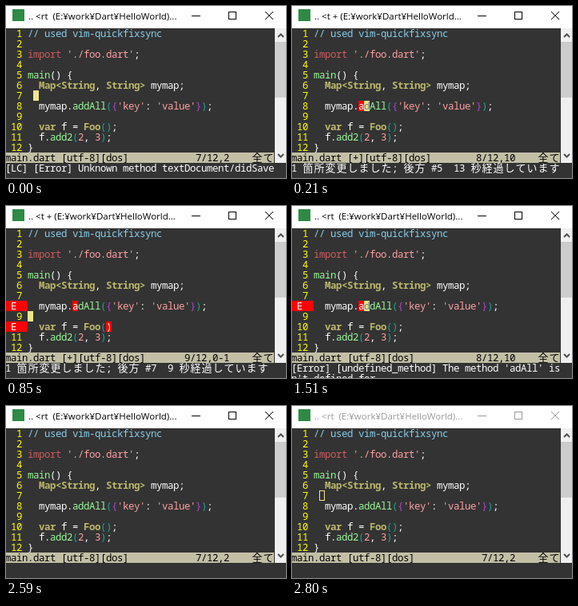
An HTML page with a canvas that plays this animation: 350x216 px, repeating every 2850 ms.

```html
<!DOCTYPE html>
<html lang="ja">
<head>
<meta charset="utf-8">
<title>Editor session</title>
<style>
html, body { margin: 0; width: 100%; height: 100%; overflow: hidden; background: #333; }
canvas { display: block; width: 350px; height: 216px; }
</style>
</head>
<body>
<canvas id="stage" width="350" height="216"></canvas>
<script>
const ctx = document.getElementById('stage').getContext('2d');

const LOOP = 2850;
const CELL_W = 7, CELL_H = 13, LEFT = -1, TOP = 28, COLS = 48, BASE = 11;
const MONO = '12.4px "Noto Sans Mono", "DejaVu Sans Mono", monospace';
const WIDE = '13px "Noto Sans CJK JP", "Noto Sans CJK", sans-serif';
const UI = '11.5px "Open Sans", "Noto Sans", sans-serif';

const C = {
  bg: '#333333', text: '#ffffff', number: '#ffff00', comment: '#87ceeb',
  include: '#cd5c5c', string: '#ffa0a0', type: '#bdb76b', func: '#98fb98',
  paren: '#20a39a', brace: '#a848cc', error: '#ff0000',
  cursor: '#f0e68c', onCursor: '#708090', status: '#c2bfa5'
};

const plain = s => [s, C.text];
const str = s => [s, C.string];
const func = s => [s, C.func];
const paren = s => [s, C.paren];
const type = s => [s, C.type, true];
const callLine = name => [
  plain('  mymap.'), func(name), paren('('), ['{', C.brace], str("'key'"), plain(': '),
  str("'value'"), ['}', C.brace], paren(')'), plain(';')
];

function codeLines(s) {
  return [
    [['// used vim-quickfixsync', C.comment]],
    [],
    [['import ', C.include], str("'./foo.dart'"), plain(';')],
    [],
    [func('main'), plain('() {')],
    [plain('  '), type('Map<String'), plain(', '), type('String>'), plain(' mymap;')],
    [],
    callLine(s.call),
    [],
    [type('  var'), plain(' f = '), type('Foo'), paren('()'), plain(s.noSemi ? '' : ';')],
    [plain('  f.'), func('add2'), paren('('), str('2'), plain(', '), str('3'), paren(')'), plain(';')],
    [plain('}')]
  ];
}

const undoText = (n, sec) => `1 箇所変更しました; 後方 #${n}  ${sec} 秒経過しています`;

// cursor: [line, column]; signs: lines with an error; marks: red cells
const saved = { call: 'addAll', cursor: [7, 2], pos: '7/12,2', signs: [], marks: [], msg: [] };
const broken = { call: 'adAll', modified: true, signs: [8, 10], noSemi: true,
  marks: [[8, 9], [10, 15]], msg: [undoText(7, 9)] };
const states = [
  { ...saved, at: 0, msg: ['[LC] [Error] Unknown method textDocument/didSave'] },
  { ...broken, at: 210, signs: [], noSemi: false, marks: [[8, 9]],
    cursor: [8, 10], pos: '8/12,10', msg: [undoText(5, 13)] },
  { ...broken, at: 430, cursor: [10, 15], pos: '10/12,15' },
  { ...broken, at: 850, cursor: [9, 1], pos: '9/12,0-1' },
  { ...saved, at: 1510, cursor: [8, 10], pos: '8/12,10', signs: [8], marks: [[8, 9]],
    msg: ["[Error] [undefined_method] The method 'adAll' is", "n't defined for"] },
  { ...saved, at: 1720 },
  { ...saved, at: 2590, shape: 'off' },
  { ...saved, at: 2800, shape: 'hollow', inactive: true }
];

const cellX = col => LEFT + col * CELL_W;
const rowY = row => TOP + row * CELL_H;

function box(x, y, w, h, color) {
  ctx.fillStyle = color;
  ctx.fillRect(x, y, w, h);
}

// Draws text on the cell grid and returns the next free column.
function put(text, col, row, color, bold) {
  ctx.fillStyle = color;
  for (const ch of text) {
    const wide = ch.charCodeAt(0) > 0x2e80;
    ctx.font = wide ? WIDE : (bold ? 'bold ' : '') + MONO;
    ctx.fillText(ch, cellX(col) + (wide ? 0.5 : 0), rowY(row) + BASE);
    col += wide ? 2 : 1;
  }
  return col;
}

function titleBar(s) {
  const ink = s.inactive ? '#999999' : '#000000';
  box(0, 0, 350, TOP, '#ffffff');
  box(8, 4, 15, 15, '#2f8a45');
  ctx.font = UI;
  ctx.fillStyle = ink;
  ctx.fillText(s.modified ? '.. <t + (E:¥work¥Dart¥HelloWorld...'
                          : '.. <rt  (E:¥work¥Dart¥HelloWorld)...', 28, 17);
  box(232, 12, 11, 1, ink);
  ctx.strokeStyle = ink;
  ctx.lineWidth = 1;
  ctx.strokeRect(278.5, 7.5, 9, 9);
  ctx.beginPath();
  ctx.moveTo(324, 7);
  ctx.lineTo(334, 17);
  ctx.moveTo(334, 7);
  ctx.lineTo(324, 17);
  ctx.stroke();
}

function chevron(y, dir) {
  ctx.strokeStyle = '#505050';
  ctx.lineWidth = 2;
  ctx.beginPath();
  ctx.moveTo(340, y + 2 * dir);
  ctx.lineTo(343.5, y - 1.5 * dir);
  ctx.lineTo(347, y + 2 * dir);
  ctx.stroke();
}

function scrollBar() {
  box(336, TOP, 14, 13 * CELL_H, '#f0f0f0');
  box(336, 45, 14, 70, '#cdcdcd');
  chevron(37, 1);
  chevron(188, -1);
}

function lineNumber(n, s) {
  if (s.signs.includes(n)) {
    box(0, rowY(n - 1), cellX(4), CELL_H, C.error);
    put('E', 1, n - 1, C.text);
  } else {
    put(String(n).padStart(3), 0, n - 1, C.number);
  }
}

function highlight(line, column, chars, back, fore) {
  const col = column + 3, row = line - 1;
  box(cellX(col), rowY(row), CELL_W, CELL_H, back);
  put(chars[column - 1] || '', col, row, fore);
}

function editor(s) {
  const lines = codeLines(s);
  const text = n => lines[n - 1].map(part => part[0]).join('');
  lines.forEach((parts, row) => {
    lineNumber(row + 1, s);
    let col = 4;
    for (const [t, color, bold] of parts) col = put(t, col, row, color, bold);
  });
  for (const [line, col] of s.marks) highlight(line, col, text(line), C.error, C.text);

  const [line, col] = s.cursor;
  if (s.shape === 'hollow') {
    ctx.strokeStyle = C.cursor;
    ctx.lineWidth = 1;
    ctx.strokeRect(cellX(col + 3) + 0.5, rowY(line - 1) + 0.5, CELL_W - 1, CELL_H - 1);
  } else if (s.shape !== 'off') {
    highlight(line, col, text(line), C.cursor, C.onCursor);
  }
}

function statusLine(s) {
  box(0, rowY(12), cellX(COLS), CELL_H, C.status);
  put(`main.dart ${s.modified ? '[+]' : ''}[utf-8][dos]`, 0, 12, '#000000');
  put(s.pos, 40 - s.pos.length, 12, '#000000');
  put('全て', 44, 12, '#000000');
}

function draw(t) {
  const s = states.findLast(state => state.at <= t);
  box(0, 0, 350, 216, C.bg);
  editor(s);
  statusLine(s);
  s.msg.forEach((line, i) => put(line, 0, 13 + i, C.text));
  scrollBar();
  titleBar(s);
}

const start = performance.now();
function tick() {
  draw((performance.now() - start) % LOOP);
  requestAnimationFrame(tick);
}
tick();
</script>
</body>
</html>
```
